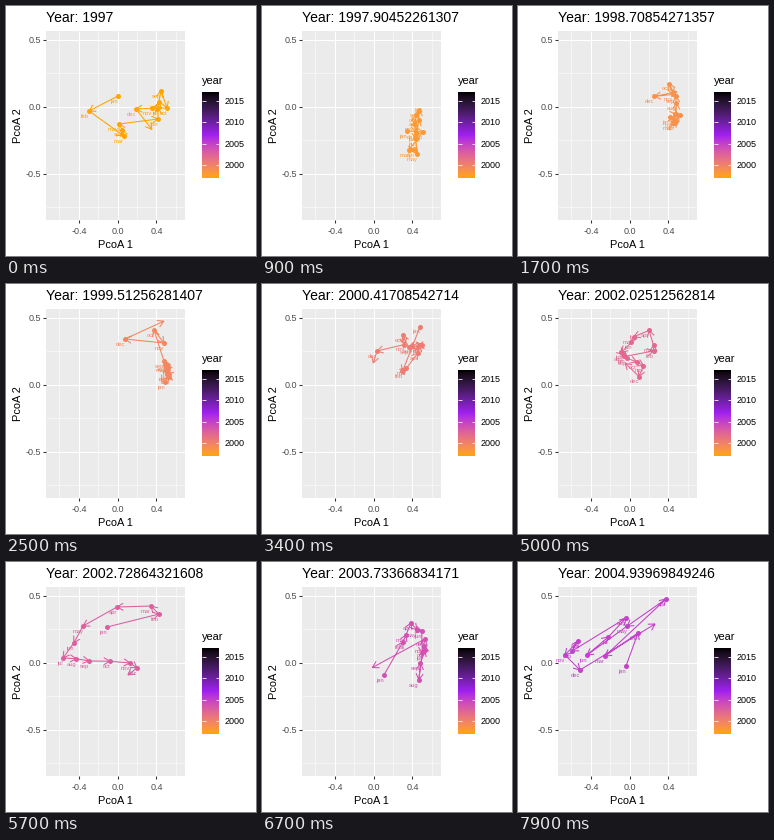
Animation, 250 px wide and 250 px high, one loop 8000 ms. Source, as a matplotlib script:

```python
import numpy as np
import matplotlib.pyplot as plt
from matplotlib.animation import FuncAnimation
from matplotlib.patches import Rectangle

SIZE, DPI = 250, 72
FRAMES, INTERVAL = 80, 100
START, SPAN, STEPS = 1997, 20, 199
MONTHS = "jan feb mar apr may jun jul aug sep oct nov dec".split()
HEAD, HEAD_ANGLE = 7.2, np.radians(30)
LEFT, TOP, RIGHT, BOTTOM = 40, 25, 179, 214
GREY, DARK = "#4D4D4D", "#333333"

plt.rcParams["font.family"] = "Liberation Sans"


# Colour scale: orange - purple - black, blended in CIE Lab
RGB_XYZ = np.array([[0.4124, 0.3576, 0.1805],
                    [0.2126, 0.7152, 0.0722],
                    [0.0193, 0.1192, 0.9505]])
WHITE = RGB_XYZ.sum(axis=1)


def to_lab(rgb):
    c = np.array(rgb) / 255
    lin = np.where(c > 0.04045, ((c + 0.055) / 1.055) ** 2.4, c / 12.92)
    t = RGB_XYZ @ lin / WHITE
    f = np.where(t > 0.008856, np.cbrt(t), 7.787 * t + 16 / 116)
    return np.array([116 * f[1] - 16, 500 * (f[0] - f[1]), 200 * (f[1] - f[2])])


def to_rgb(lab):
    fy = (lab[0] + 16) / 116
    f = np.array([fy + lab[1] / 500, fy, fy - lab[2] / 200])
    t = np.where(f > 0.2069, f ** 3, (f - 16 / 116) / 7.787)
    lin = np.clip(np.linalg.solve(RGB_XYZ, t * WHITE), 0, 1)
    return np.clip(np.where(lin > 0.0031308,
                            1.055 * lin ** (1 / 2.4) - 0.055, 12.92 * lin), 0, 1)


STOPS = np.array([to_lab(c) for c in ((255, 165, 0), (160, 32, 240), (0, 0, 0))])


def year_color(year):
    at = START + SPAN * np.array([0, 0.5, 1])
    return to_rgb(np.array([np.interp(year, at, ch) for ch in STOPS.T]))


def blend(t, times, points):
    """Linear motion through points reached at the given times."""
    points = np.array(points, float)
    flat = points.reshape(len(points), -1)
    out = [np.interp(t, times, col) for col in flat.T]
    return np.array(out).reshape(points.shape[1:])


# A year's walk passes a few turning points; the months between
# lie on straight lines, scattered by a seeded jitter.
walks = {}


def walk(year, spread, **turns):
    at = [MONTHS.index(m) for m in turns]
    rng = np.random.default_rng(int(year))
    path = []
    for m in range(1, 12):
        pos = blend(m, at, list(turns.values()))
        if m not in at:
            pos = pos + rng.uniform(-1, 1, 2) * spread
        path.append(pos)
    walks[year] = path


walk(1997, (2, 2), feb=(83, 105), mar=(118, 130), may=(113, 118),
     jun=(152, 113), sep=(155, 85), oct=(161, 102), dec=(130, 103))
walk(1997.9, (4, 9), feb=(161, 126), mar=(147, 144), may=(155, 148),
     sep=(157, 104), dec=(154, 126))
walk(1999.51, (4, 5), feb=(163, 93), sep=(158, 77), oct=(148, 46),
     nov=(158, 59), dec=(119, 55))
walk(2001.32, (2, 1), feb=(118, 82), mar=(126, 78), apr=(151, 48),
     jun=(159, 36), aug=(140, 44), nov=(127, 62), dec=(111, 79))
walk(2002.73, (1, 1), feb=(153, 52), mar=(145, 44), apr=(111, 45),
     may=(77, 64), jul=(57, 96), sep=(83, 99), nov=(124, 101), dec=(131, 106))
walk(2003.73, (2, 3), feb=(141, 80), apr=(149, 61), jun=(160, 69),
     aug=(157, 118), oct=(163, 88), dec=(163, 77))
walk(2004.94, (2, 2), feb=(120, 71), mar=(87, 94), apr=(148, 37), jun=(69, 93),
     aug=(108, 56), sep=(54, 89), oct=(60, 79), nov=(47, 93), dec=(62, 108))

# January has its own track, because December points at the next January
JAN = {1997: (112, 90), 1997.9: (145, 125), 1999.51: (159, 98),
       2000.51: (158, 37), 2001.32: (112, 80), 2002.73: (101, 65),
       2003.73: (122, 113), 2004.94: (108, 104), 2005.94: (137, 62)}


def positions(year):
    jan, tip = (blend(y, list(JAN), list(JAN.values())) for y in (year, year + 1))
    return np.vstack([jan, blend(year, list(walks), list(walks.values())), tip])


def arrow_path(pts):
    """All arrows as one polyline, broken up by NaN."""
    out = []
    gap = [np.nan, np.nan]
    for a, b in zip(pts[:-1], pts[1:]):
        back = np.arctan2(*(a - b)[::-1])
        wings = [b + HEAD * np.array([np.cos(back + s), np.sin(back + s)])
                 for s in (HEAD_ANGLE, -HEAD_ANGLE)]
        out += [a, b, gap, wings[0], b, wings[1], gap]
    return np.array(out).T


fig = plt.figure(figsize=(SIZE / DPI, SIZE / DPI), dpi=DPI, facecolor="white")
ax = fig.add_axes([0, 0, 1, 1])
ax.set_xlim(0, SIZE)
ax.set_ylim(SIZE, 0)
ax.axis("off")


def px(x):
    return 111.5 + 97.2 * x


def py(y):
    return 100.7 - 133.6 * y


def line(x, y, color, width, z=1):
    ax.plot(x, y, color=color, lw=width, solid_capstyle="butt", zorder=z)


def label(x, y, text, size, color="black", **kw):
    return ax.text(x, y, text, fontsize=size, color=color, **kw)


# Panel, grid and axes
ax.add_patch(Rectangle((LEFT, TOP), RIGHT - LEFT, BOTTOM - TOP,
                       fc="#EBEBEB", ec="none", zorder=0))
for v in (-0.6, -0.2, 0.2, 0.6):
    line([px(v)] * 2, [TOP, BOTTOM], "white", 0.53)
for v in (-0.75, -0.25, 0.25):
    line([LEFT, RIGHT], [py(v)] * 2, "white", 0.53)
for v in (-0.4, 0, 0.4):
    line([px(v)] * 2, [TOP, BOTTOM], "white", 1.07)
    line([px(v)] * 2, [BOTTOM, BOTTOM + 2.75], DARK, 1.07)
    label(px(v) + 0.5, 228, f"{v:.1f}", 9, GREY, ha="center")
for v in (-0.5, 0, 0.5):
    line([LEFT, RIGHT], [py(v)] * 2, "white", 1.07)
    line([LEFT - 2.75, LEFT], [py(v)] * 2, DARK, 1.07)
    label(35, py(v) + 3.5, f"{v:.1f}", 9, GREY, ha="right")
label(109.5, 242.5, "PcoA 1", 11, ha="center")
label(12, 119.5, "PcoA 2", 11, ha="center", va="center", rotation=90)
title = label(40, 16.5, "", 14)

# Colour bar
BAR_X, BAR_Y, BAR_W, BAR_H = 196, 86, 17, 86
shades = [[year_color(y)] for y in np.linspace(START + SPAN, START, BAR_H)]
ax.imshow(shades, extent=(BAR_X, BAR_X + BAR_W, BAR_Y + BAR_H, BAR_Y),
          aspect="auto", interpolation="bilinear", zorder=1)
label(BAR_X, 78.5, "year", 11)
for year in range(2000, 2016, 5):
    y = BAR_Y + BAR_H * (START + SPAN - year) / SPAN
    for x in (BAR_X, BAR_X + BAR_W - 3.5):
        line([x, x + 3.5], [y, y], "white", 0.8, 2)
    label(218.5, y + 3.2, str(year), 9)

dots, = ax.plot([], [], "o", ms=5, mew=0, zorder=3)
arrows, = ax.plot([], [], lw=1.07, solid_capstyle="butt",
                  solid_joinstyle="miter", zorder=4)
tags = [label(0, 0, m, 5.7, ha="right", zorder=5) for m in MONTHS]


def update(i):
    year = START + i * SPAN / STEPS
    color = year_color(year)
    pts = positions(year)
    title.set_text(f"Year: {year:.15g}")
    dots.set_data(*pts[:-1].T)
    arrows.set_data(*arrow_path(pts))
    for artist in (dots, arrows, *tags):
        artist.set_color(color)
    for tag, (x, y) in zip(tags, pts):
        tag.set_position((x, y + 6.8))
    return [title, dots, arrows, *tags]


anim = FuncAnimation(fig, update, frames=FRAMES, interval=INTERVAL,
                     repeat=True, repeat_delay=0, blit=False)
plt.show()
```
